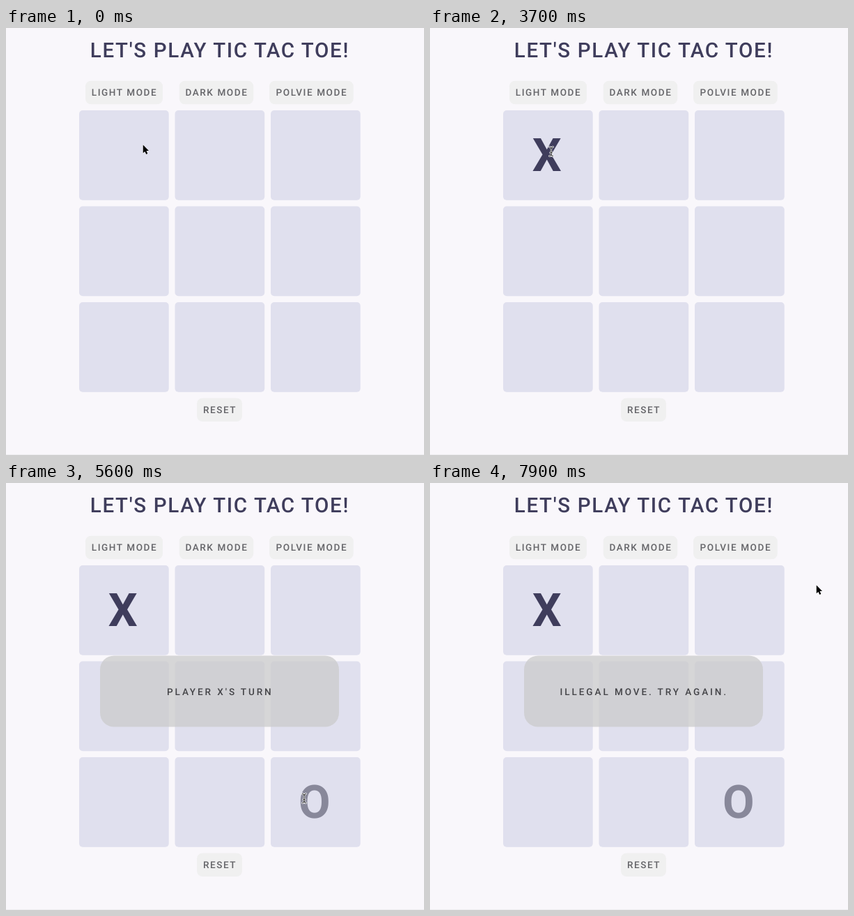
An HTML page that plays this animation: 600 by 612 pixels, repeating every 8000 ms.

```html
<!DOCTYPE html>
<html lang="en">
<head>
<meta charset="utf-8">
<title>Tic Tac Toe</title>
<style>
  html, body { margin: 0; width: 100%; height: 100%; overflow: hidden; background: #f9f7fb; }
  svg { display: block; width: 600px; height: 612px; }
  text {
    font: 500 13.5px Roboto, sans-serif; letter-spacing: 1.6px; text-anchor: middle;
    text-rendering: geometricPrecision; fill: #646468;
  }
  .title { font-size: 29.5px; letter-spacing: 1.67px; fill: #3f3d5c; }
  .mark { font-size: 66px; font-weight: 700; letter-spacing: 0; fill: #3f3d5c; }
  .notice { letter-spacing: 2.93px; fill: #444448; }
  .tile { fill: #e0e0ee; }
  .button { fill: #f0f0f0; }
</style>
</head>
<body>
<svg viewBox="0 0 600 612">
  <defs>
    <path id="beamShape" d="M-2.7-6.5Q0-6.5 0-4.2Q0-6.5 2.7-6.5M0-4.2V4.2M-2.7 6.5Q0 6.5 0 4.2Q0 6.5 2.7 6.5M-1.4 1.8H1.4"/>
  </defs>
  <rect y="611" width="600" height="1" fill="#eeedf0"/>
  <text class="title" x="306.9" y="42">LET'S PLAY TIC TAC TOE!</text>
  <g id="board"></g>
  <text class="mark" id="markX" x="167.7" y="204.7">X</text>
  <text class="mark" id="markO" x="442.7" y="479.7" style="fill:#88889a">O</text>
  <g id="toast">
    <rect x="135" y="247.5" width="343" height="102" rx="20" fill="#cbcbcb" fill-opacity=".75"/>
    <text class="notice" id="message" x="307.3" y="303.6"></text>
  </g>
  <g id="cursor">
    <path id="arrow" d="M.7 .5V12.3L3.4 9.9 5.2 13.9 7.3 13 5.5 9.1H9Z" stroke="#fff" paint-order="stroke"/>
    <g id="beam" fill="none" stroke-linecap="round">
      <use href="#beamShape" stroke="#fff" stroke-width="2.4"/>
      <use href="#beamShape" stroke="#222"/>
    </g>
  </g>
</svg>
<script>
const LOOP = 8000, STEP = 100;
const $ = id => document.getElementById(id);
const rect = (kind, x, y, w, h, r) =>
  `<rect class="${kind}" x="${x}" y="${y}" width="${w}" height="${h}" rx="${r}"/>`;
const button = (label, x, y, w, h) =>
  rect('button', x, y, w, h, 8) + `<text x="${x + w / 2 + 0.5}" y="${y + 21.3}">${label}</text>`;

let board = '';
for (let i = 0; i < 9; i++)
  board += rect('tile', 105 + i % 3 * 137.5, 118 + Math.floor(i / 3) * 137.5, 128.7, 128.7, 5);
board += button('LIGHT MODE', 114, 75.7, 111, 33.6)
  + button('DARK MODE', 248.7, 75.7, 106.5, 33.6)
  + button('POLVIE MODE', 378, 75.7, 120.7, 33.6)
  + button('RESET', 274, 530.4, 65, 33.6);
$('board').innerHTML = board;

// Pointer path: time, x, y
const path = [
  [0, 196, 167], [100, 191, 167], [1600, 191, 167], [1800, 173, 176],
  [2600, 173, 176], [2700, 174, 178], [3700, 174, 177], [4400, 367, 331],
  [4700, 430, 390], [5100, 429, 450], [5500, 428, 452], [5600, 428, 452],
  [6300, 436, 446], [6600, 436, 446], [7200, 547, 178], [7400, 554, 146], [LOOP, 554, 146]
];
// Notices: start, end, text
const notices = [
  [2700, 3700, "PLAYER O'S TURN"],
  [5500, 6500, "PLAYER X'S TURN"],
  [7800, LOOP, 'ILLEGAL MOVE. TRY AGAIN.']
];
const show = (id, visible) => $(id).setAttribute('visibility', visible ? 'visible' : 'hidden');
const within = (t, from, to) => t >= from && t < to;

function pointerAt(t) {
  const i = path.findIndex(key => key[0] > t);
  const [t0, x0, y0] = path[i - 1], [t1, x1, y1] = path[i];
  const k = (t - t0) / (t1 - t0);
  return [x0 + (x1 - x0) * k, y0 + (y1 - y0) * k];
}

function render(t) {
  show('markX', t >= 2700);
  show('markO', t >= 5500);
  const notice = notices.find(([from, to]) => within(t, from, to));
  show('toast', notice);
  $('message').textContent = notice ? notice[2] : '';
  const overText = within(t, 2700, 3800) || within(t, 5500, 6700);
  show('beam', overText);
  show('arrow', !overText);
  $('cursor').setAttribute('transform', `translate(${pointerAt(t)})`);
}

const start = performance.now();
function frame() {
  const t = (performance.now() - start) % LOOP;
  render(Math.floor(t / STEP) * STEP);
  requestAnimationFrame(frame);
}
frame();
</script>
</body>
</html>
```
